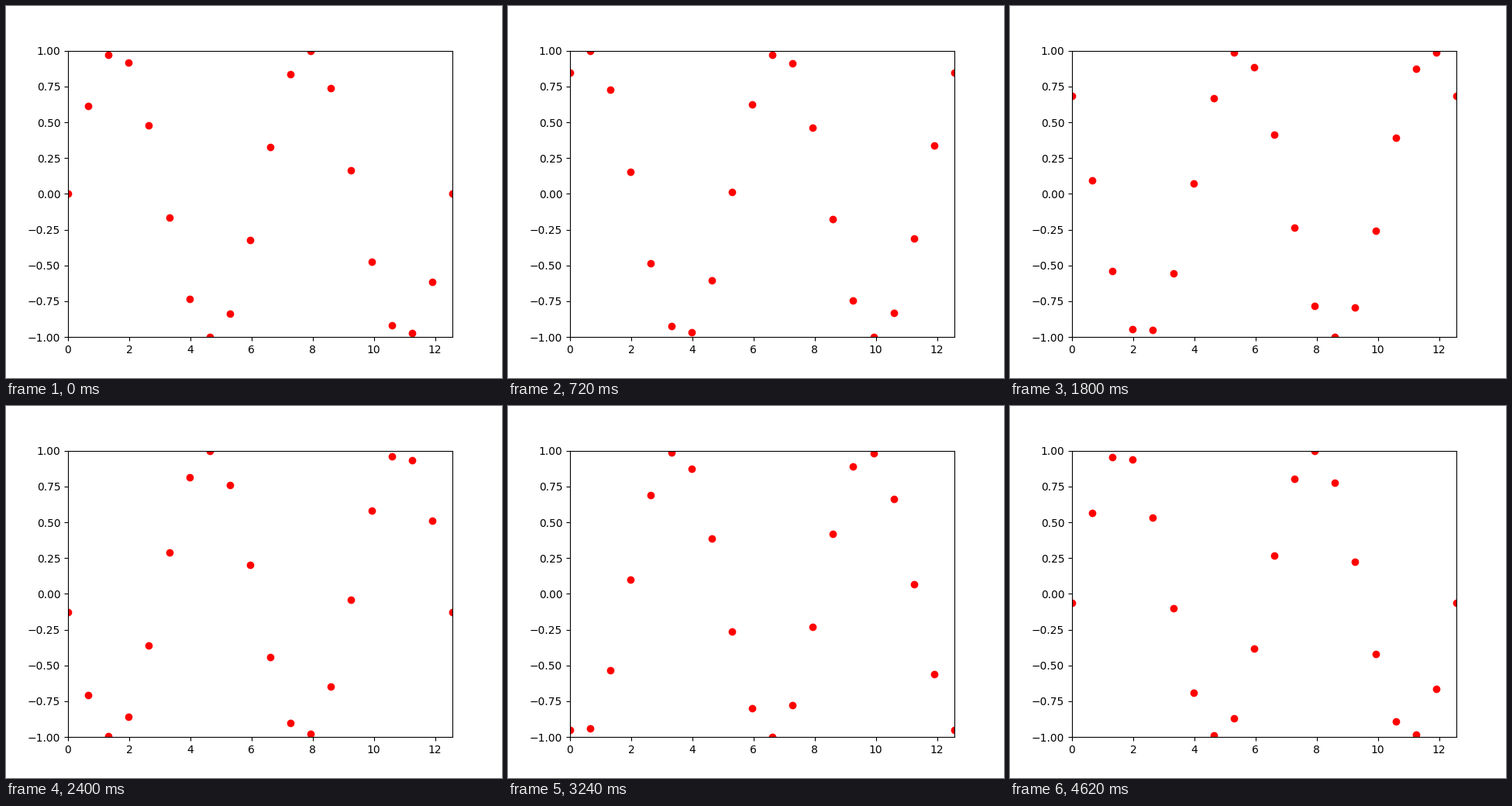
Recreate the animation shown at these times as a matplotlib script. Size 640 by 480 pixels, loop 4640 ms.

```python
import numpy as np
import matplotlib.pyplot as plt
from matplotlib.animation import FuncAnimation

TICK_MS = 20
TICKS = 232
STEPS = 100
# Every three steps last 20, 100 and 20 ms: seven ticks in all.
STEP_IN_CYCLE = (0, 1, 1, 1, 1, 1, 2)

fig, ax = plt.subplots(figsize=(6.4, 4.8), dpi=100)
ax.set_xlim(0, 4 * np.pi)
ax.set_ylim(-1, 1)

x = np.linspace(0, 4 * np.pi, 20)
dots, = ax.plot(x, np.sin(x), "ro")


def phase(tick):
    cycle, rest = divmod(tick, len(STEP_IN_CYCLE))
    step = 3 * cycle + STEP_IN_CYCLE[rest]
    return 2 * np.pi * step / STEPS


def update(tick):
    dots.set_ydata(np.sin(x + phase(tick)))
    return dots,


anim = FuncAnimation(fig, update, frames=TICKS, interval=TICK_MS,
                     repeat=True, repeat_delay=0, blit=False)
plt.show()
```
